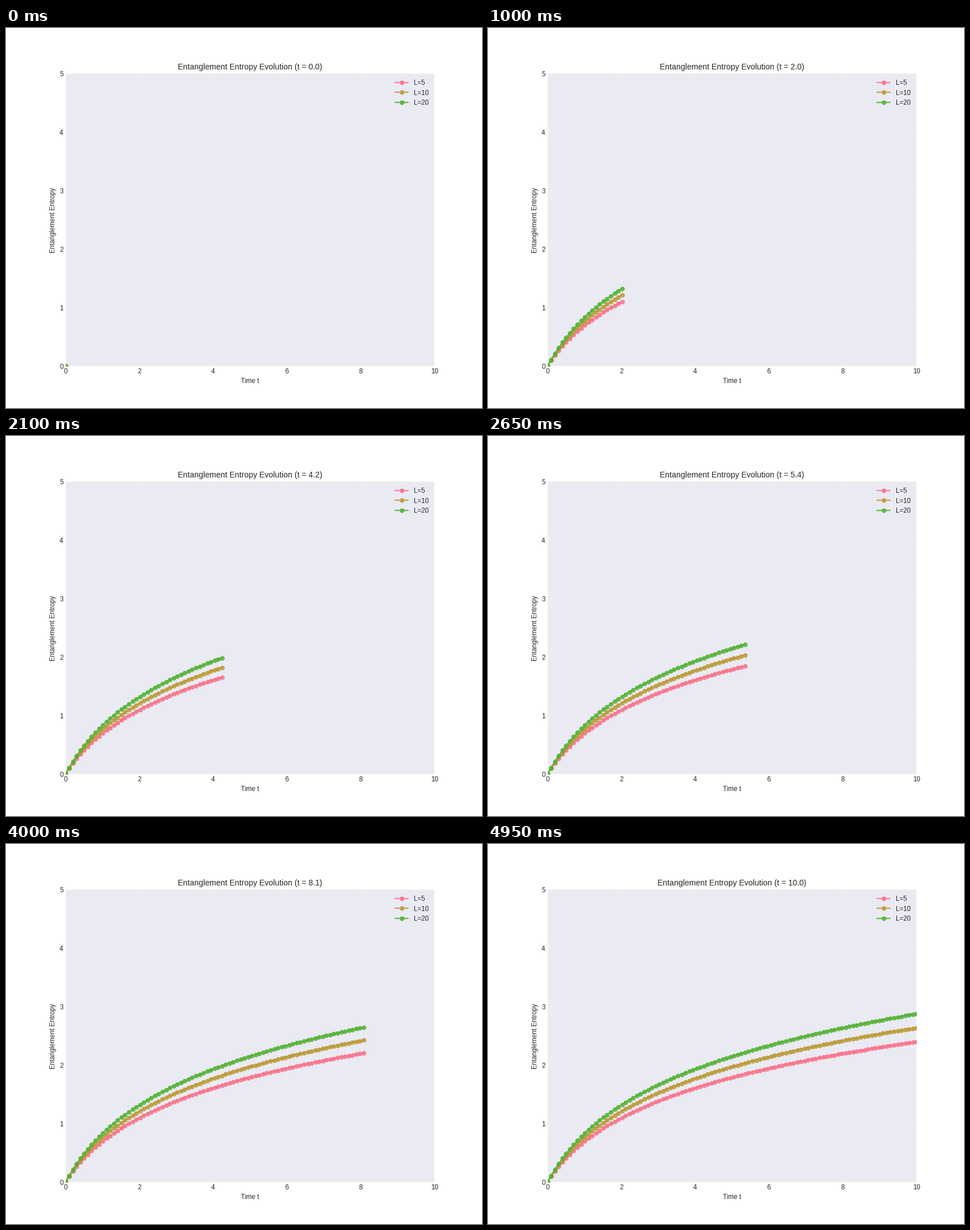
These frames come from a looping animation (837 by 669 pixels, 5 s). A matplotlib script:

```python
import numpy as np
import matplotlib.pyplot as plt
from matplotlib.animation import FuncAnimation

WIDTH, HEIGHT, DPI = 837, 669, 83.7
STEPS, INTERVAL = 100, 50
INK = "0.15"

plt.rcParams.update({
    "font.family": "Liberation Sans",
    "font.size": 10,
    "text.color": INK,
    "axes.labelcolor": INK,
    "axes.facecolor": "#EAEAF2",
    "axes.linewidth": 0,
    "axes.axisbelow": True,
    "xtick.color": INK,
    "ytick.color": INK,
    "xtick.major.size": 0,
    "ytick.major.size": 0,
    "grid.color": "white",
    "lines.solid_capstyle": "round",
    "legend.frameon": False,
})

# System size, growth factor, colour
SERIES = [(5, 1.0, "#F77189"), (10, 1.1, "#BB9832"), (20, 1.2, "#50B131")]

times = np.linspace(0, 10, STEPS)

# The small margin keeps float rounding from losing a pixel
fig, ax = plt.subplots(
    figsize=((WIDTH + 0.01) / DPI, (HEIGHT + 0.01) / DPI), dpi=DPI)
ax.set(xlim=(0, 10), ylim=(0, 5), xlabel="Time t",
       ylabel="Entanglement Entropy")
ax.grid(True, alpha=0.3)

lines = [ax.plot([], [], "o-", color=color, lw=2, alpha=0.8,
                 label=f"L={size}")[0]
         for size, _, color in SERIES]
ax.legend(loc="upper right")
title = ax.set_title("")


def update(step):
    t = times[:step + 1]
    for line, (_, factor, _) in zip(lines, SERIES):
        line.set_data(t, factor * np.log1p(t))
    title.set_text(f"Entanglement Entropy Evolution (t = {t[-1]:.1f})")
    return [*lines, title]


anim = FuncAnimation(fig, update, frames=STEPS, interval=INTERVAL,
                     repeat=True, repeat_delay=0, blit=False)
plt.show()
```
